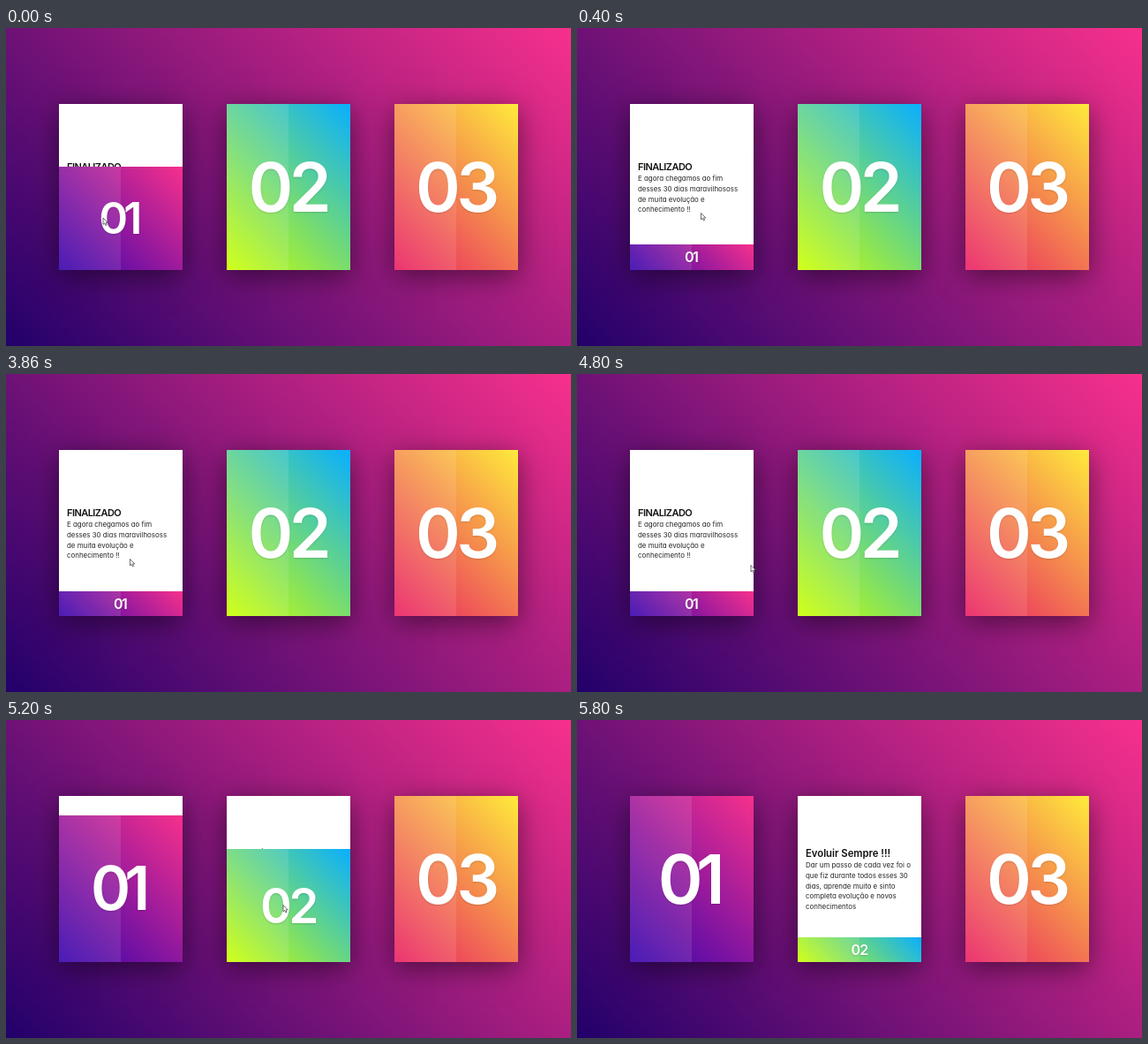
Recreate the animation shown at these times as an HTML page. Size 640 by 360 pixels, loop 8000 ms.

```html
<!DOCTYPE html>
<html lang="pt">
<head>
<meta charset="utf-8">
<title>Cards</title>
<style>
  html, body { margin: 0; width: 100%; height: 100%; overflow: hidden; }
  body {
    position: relative;
    background: linear-gradient(45deg, #22006a, #f7308c);
    font-family: Inter, sans-serif;
    font-feature-settings: "cv11";
  }
  .card {
    position: absolute; top: 86px; width: 140px; height: 188px;
    box-sizing: border-box; padding-top: 1px;
    display: flex; flex-direction: column; justify-content: center;
    background: #fff;
    box-shadow: 0 7px 30px rgba(0, 0, 0, .5);
  }
  h2, p { margin: 0 0 0 9px; white-space: nowrap; }
  h2 { font-size: 11.3px; font-weight: 600; line-height: 16px; color: #111; }
  p { font-size: 7.9px; line-height: 11.75px; color: #262626; }
  .cover {
    position: absolute; left: 0; bottom: 0; width: 100%; height: 100%;
    display: flex; align-items: center; justify-content: center;
    overflow: hidden;
    background: linear-gradient(45deg, var(--from), var(--to));
  }
  .cover::before {
    content: ""; position: absolute; left: 0; top: 0; width: 50%; height: 100%;
    background: rgba(255, 255, 255, .1);
  }
  .num {
    position: relative; color: #fff; font-weight: 560; line-height: 1;
    letter-spacing: -.06em; padding-right: .02em;
    text-shadow: 0 1px 2px rgba(0, 0, 0, .15);
  }
  #one { left: 60px; --from: #3503ad; --to: #f7308c; }
  #two { left: 250px; --from: #ccff00; --to: #09afff; }
  #three { left: 440px; --from: #e91e63; --to: #ffeb3b; }
  #one .num { letter-spacing: -.1em; padding-right: .11em; }
  #one h2 { font-size: 11px; letter-spacing: -.05em; }
  #cursor { position: absolute; left: 0; top: 0; overflow: visible; }
</style>
</head>
<body>
<div class="card" id="one">
  <h2>FINALIZADO</h2>
  <p>E agora chegamos ao fim<br>desses 30 dias maravilhososs<br>de muita evolução e<br>conhecimento !!</p>
  <div class="cover"><span class="num">01</span></div>
</div>
<div class="card" id="two">
  <h2>Evoluir Sempre !!!</h2>
  <p>Dar um passo de cada vez foi o<br>que fiz durante todos esses 30<br>dias, aprende muito e sinto<br>completa evolução e novos<br>conhecimentos</p>
  <div class="cover"><span class="num">02</span></div>
</div>
<div class="card" id="three">
  <div class="cover"><span class="num">03</span></div>
</div>
<svg id="cursor" width="7" height="10">
  <path d="M0 0V7.4L1.7 5.9 2.9 8.5 4.1 7.9 3 5.4H5.3Z" fill="#fff" stroke="#333" stroke-width=".7"/>
</svg>
<script>
const LOOP = 8000, FPS = 15, HOVER = 625;
const clamp = x => Math.min(1, Math.max(0, x));
const mix = (a, b, k) => a + (b - a) * k;

const linear = x => x;
const easeIn = x => x * x;
const easeOut = x => 1 - (1 - x) ** 2;

// The CSS "ease" curve, cubic-bezier(.25, .1, .25, 1)
function ease(x) {
  x = clamp(x);
  if (x === 0 || x === 1) return x;
  let lo = 0, hi = 1;
  const bez = (a, b, s) => 3 * a * s * (1 - s) ** 2 + 3 * b * s * s * (1 - s) + s ** 3;
  for (let i = 0; i < 24; i++) {
    const mid = (lo + hi) / 2;
    if (bez(.25, .25, mid) < x) lo = mid; else hi = mid;
  }
  return bez(.1, 1, lo);
}

// When the pointer enters and leaves each card
const hovers = [
  { id: "one", enter: -167, leave: 4846 },
  { id: "two", enter: 5054, leave: Infinity },
  { id: "three", enter: Infinity, leave: Infinity }
].map(h => ({
  ...h,
  cover: document.querySelector(`#${h.id} .cover`),
  num: document.querySelector(`#${h.id} .num`)
}));

// time, x, y, easing towards this point
const path = [
  [0, 110, 215, linear],
  [330, 140.5, 209.5, easeOut],
  [4530, 140.5, 209.5, linear],
  [4800, 197, 216.5, easeIn],
  [5200, 314, 209.5, linear],
  [5400, 330, 208, easeOut]
];
const hidden = [[1000, 3860], [5800, LOOP]];
const cursor = document.getElementById("cursor");

function pointer(t) {
  const i = path.findIndex(p => p[0] > t);
  if (i < 0) return path[path.length - 1].slice(1, 3);
  const [t0, x0, y0] = path[i - 1], [t1, x1, y1, curve] = path[i];
  const k = curve((t - t0) / (t1 - t0));
  return [mix(x0, x1, k), mix(y0, y1, k)];
}

function draw(t) {
  for (const { enter, leave, cover, num } of hovers) {
    const open = t < leave ? ease((t - enter) / HOVER) : 1 - ease((t - leave) / HOVER);
    cover.style.height = mix(188, 28, open) + "px";
    num.style.fontSize = mix(77, 16, open) + "px";
  }
  const [x, y] = pointer(t);
  cursor.style.transform = `translate(${x}px, ${y}px)`;
  cursor.style.visibility = hidden.some(([a, b]) => t >= a && t < b) ? "hidden" : "visible";
}

const start = performance.now();
function tick() {
  const t = (performance.now() - start) % LOOP;
  // Steps of 1/15 s, each starting on a rounded-down 10 ms
  const step = Math.floor((t + 7) * FPS / 1000);
  draw(Math.min(Math.round(step * 1000 / FPS), LOOP - 1));
  requestAnimationFrame(tick);
}
tick();
</script>
</body>
</html>
```
